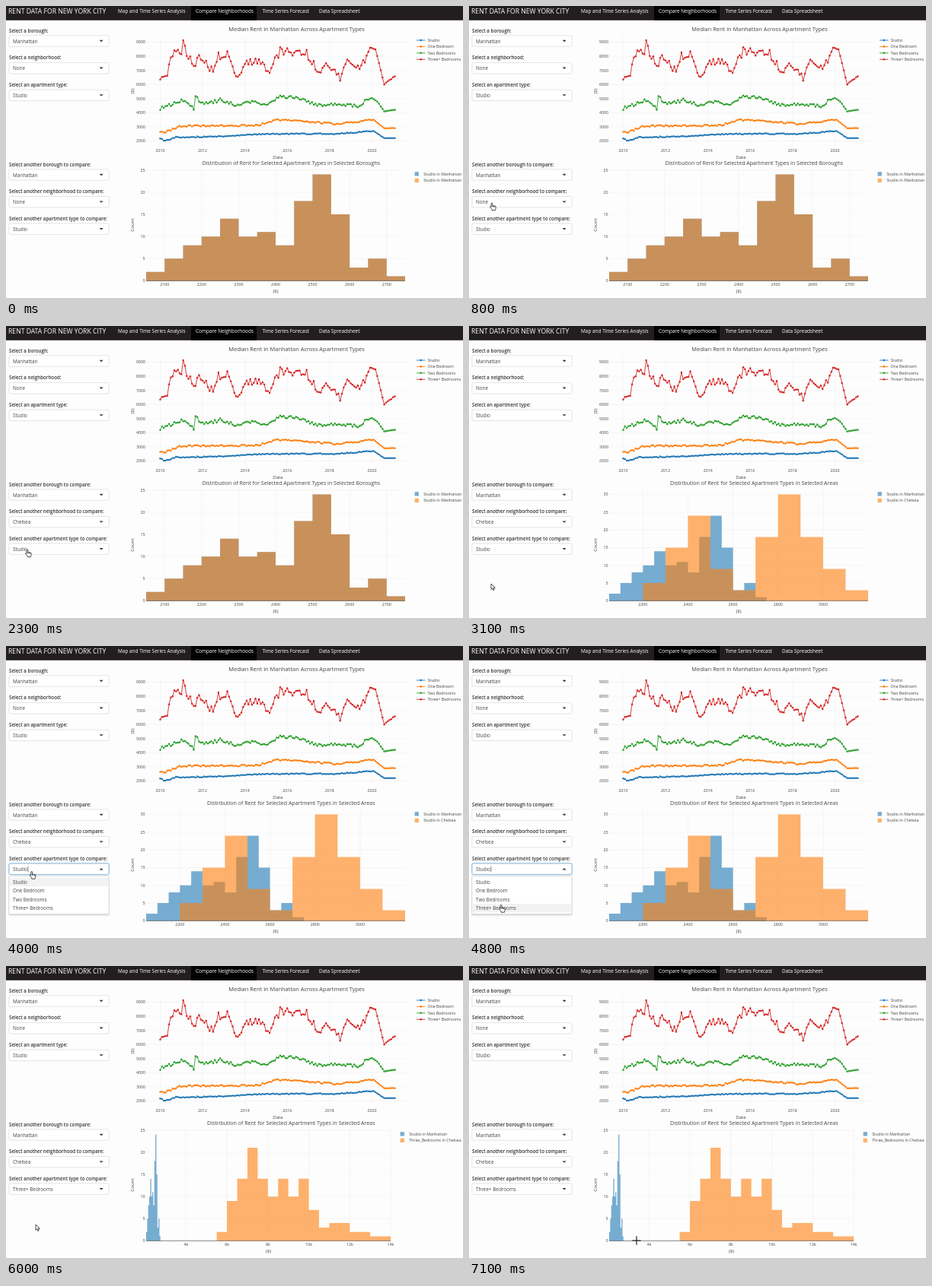
An HTML page for the animation above (7200 ms loop, 600 by 384 pixels).

```html
<!DOCTYPE html>
<html lang="en">
<head>
<meta charset="utf-8">
<title>Rent data</title>
<style>
  html, body { margin: 0; width: 100%; height: 100%; overflow: hidden; background: #fdfdfd; }
  svg { display: block; width: 600px; height: 384px; }
  text { white-space: pre; font-family: "Open Sans", "Noto Sans", sans-serif; }
</style>
</head>
<body>
<svg id="stage" viewBox="0 0 600 384"><g id="fixed"></g><g id="live"></g></svg>
<script>
const LOOP = 7200, STEP = 100;
const BLUE = '#1f77b4', ORANGE = '#ff7f0e', GREEN = '#2ca02c', RED = '#d62728';
const GRID = '#ececec';

// Helpers: text y is the vertical centre of the capitals
const rect = (x, y, w, h, fill, extra = '') =>
  `<rect x="${x}" y="${y}" width="${w}" height="${h}" fill="${fill}" ${extra}/>`;
const line = (x1, y1, x2, y2, color, w) =>
  `<path d="M${x1} ${y1}L${x2} ${y2}" stroke="${color}" stroke-width="${w}"/>`;
const text = (x, y, s, size, fill, extra = '') =>
  `<text x="${x}" y="${y + size * 0.36}" font-size="${size}" fill="${fill}" ${extra}>${s}</text>`;
const ui = (x, y, s) => text(x, y, s, 6.35, '#444');
const plot = (x, y, s, size = 5.27, anchor = 'start') => text(x, y, s, size, '#444', `text-anchor="${anchor}"`);
const upright = (x, y, s) => `<g transform="translate(${x} ${y}) rotate(-90)">${plot(0, 0, s, 6.14, 'middle')}</g>`;

// ---- Page header, labels, selects ----
function header() {
  const tabs = [[147, 'Map and Time Series Analysis'], [249, 'Compare Neighborhoods'],
    [336.5, 'Time Series Forecast'], [411, 'Data Spreadsheet']];
  return rect(0, 0, 600, 18.8, '#221e20') + rect(243, 0, 86, 18.8, '#030303') +
    text(3, 6.5, 'RENT DATA FOR NEW YORK CITY', 8.65, '#fff') +
    tabs.map(([x, s]) => text(x, 7.1, s, 6.45, '#fff')).join('');
}

function labels() {
  const group = (top, names) => names.map((s, i) =>
    text(4, top + i * 35.65, `Select ${s}:`, 6.2, '#333', 'font-weight="600"')).join('');
  return group(32.4, ['a borough', 'a neighborhood', 'an apartment type']) +
    group(208.4, ['another borough to compare', 'another neighborhood to compare', 'another apartment type to compare']);
}

function select(y, value, open) {
  const edge = open ? 'stroke="#74a9cf" stroke-width=".8"' : 'stroke="#d2d2d2" stroke-width=".6"';
  const glow = open ? rect(3.2, y - 8, 132.6, 16, 'none', 'rx="2.4" stroke="#d3e6f2" stroke-width=".9"') : '';
  const d = open ? 1.2 : -1.2;
  return glow + rect(4, y - 7.2, 131, 14.4, '#fff', `rx="1.8" ${edge}`) + ui(9, y + 0.3, value) +
    `<path d="M122.6 ${y + d}h5l-2.5 ${-2 * d}z" fill="#333"/>`;
}

// ---- Rent over time ----
const MONTHS = 134;
const monthX = i => 202.5 + i * 2.316;
const rentY = v => 177.4 - (v - 20) * 1.855;

// Turning points as [month, rent in hundreds], plus the size of the monthly jitter
const rents = [
  { name: 'Studio', color: BLUE, jitter: 0.35,
    keys: [[0, 22], [2, 20], [9, 22.5], [30, 23], [60, 25], [100, 25], [121, 27], [127, 22], [133, 22]] },
  { name: 'One Bedroom', color: ORANGE, jitter: 0.6,
    keys: [[0, 27], [3, 26], [11, 30.5], [55, 31], [66, 35], [80, 34], [100, 32], [121, 35], [127, 29], [133, 29]] },
  { name: 'Two Bedrooms', color: GREEN, jitter: 1.2,
    keys: [[0, 43], [13, 49], [19, 43], [20, 51], [25, 46], [34, 49], [43, 45], [48, 48], [62, 46],
      [67, 51], [76, 51], [88, 46], [113, 45], [119, 51], [123, 48], [127, 41], [133, 42]] },
  { name: 'Three+ Bedrooms', color: RED, jitter: 2.8,
    keys: [[0, 66], [3, 65], [8, 84], [12, 80], [13, 89], [16, 79], [20, 72], [22, 81], [30, 69], [33, 80], [39, 81],
      [43, 66], [49, 75], [57, 77], [62, 69], [68, 84], [74, 83], [83, 82], [91, 67], [95, 76],
      [102, 64], [107, 79], [113, 70], [119, 86], [122, 85], [127, 60], [133, 66]] }
];

function randomFrom(seed) {
  return () => (seed = seed * 16807 % 2147483647) / 2147483647;
}

function rentAt(keys, month) {
  const i = Math.max(1, keys.findIndex(k => k[0] >= month));
  const [m1, v1] = keys[i - 1], [m2, v2] = keys[i];
  return v1 + (v2 - v1) * (month - m1) / (m2 - m1);
}

function series({ keys, color, jitter }, index) {
  const random = randomFrom(4211 + index * 977);
  const pts = Array.from({ length: MONTHS }, (_, i) => {
    const calm = i > 119 ? 0.1 : 1;
    const v = rentAt(keys, i) + (random() * 2 - 1) * jitter * calm;
    return [monthX(i).toFixed(2), rentY(v).toFixed(2)];
  });
  return `<polyline points="${pts.join(' ')}" fill="none" stroke="${color}" stroke-width=".9" stroke-linejoin="round"/>` +
    pts.map(([x, y]) => `<circle cx="${x}" cy="${y}" r="1.25" fill="${color}"/>`).join('');
}

function rentChart() {
  let s = plot(381.5, 30.8, 'Median Rent in Manhattan Across Apartment Types', 7.46, 'middle');
  for (let v = 20; v <= 90; v += 10) {
    s += line(184, rentY(v), 529, rentY(v), GRID, 0.5) + plot(183, rentY(v), v * 100, 5.27, 'end');
  }
  for (let year = 2010; year <= 2020; year += 2) {
    const x = monthX((year - 2010) * 12);
    s += line(x, 40, x, 184.5, GRID, 0.5) + plot(x, 190.5, year, 5.27, 'middle');
  }
  s += plot(357, 199, 'Date', 6.14, 'middle') + upright(166, 112, '($)');
  rents.forEach((rent, i) => {
    const y = 45 + i * 8.4;
    s += series(rent, i) + line(539, y, 550.5, y, rent.color, 0.9) +
      `<circle cx="544.8" cy="${y}" r="1.3" fill="${rent.color}"/>` + plot(553.4, y, rent.name);
  });
  return s;
}

// ---- Histograms ----
const LEFT = 184, BASE = 361.4, LOWEST = 2050;
const studio = { name: 'Studio in Manhattan', from: LOWEST, size: 50,
  n: [2, 5, 8, 10, 14, 10, 11, 8, 18, 24, 15, 3, 5, 1] };
const chelseaStudio = { name: 'Studio in Chelsea', from: 2200, size: 100,
  n: [5, 15, 24, 9, 3, 18, 30, 18, 9, 3] };
const chelseaThree = { name: 'Three_Bedrooms in Chelsea', from: 5500, size: 500,
  n: [2, 9, 14, 21, 14, 10, 14, 10, 14, 7, 3, 4, 4, 2, 2, 1, 1] };

function histogram(other, area, right, step, lastTick) {
  const high = other.from + other.n.length * other.size;
  const most = Math.max(...studio.n, ...other.n);
  const px = v => +(LEFT + (v - LOWEST) / (high - LOWEST) * (right - LEFT)).toFixed(2);
  const py = n => +(BASE - n / most * 139.8).toFixed(2);
  const bars = ({ from, size, n }, color) => {
    const tops = n.map((c, i) => `V${py(c)}H${px(from + (i + 1) * size)}`).join('');
    return `<path d="M${px(from)} ${BASE}${tops}V${BASE}Z" fill="${color}" fill-opacity=".6"/>`;
  };

  let s = plot(374.3, 206.6, `Distribution of Rent for Selected Apartment Types in Selected ${area}`, 7.04, 'middle');
  for (let n = 0; n <= most * 1.05; n += 5) {
    s += line(LEFT, py(n), right, py(n), GRID, 0.5) + plot(182.5, py(n), n, 5.27, 'end');
  }
  for (let v = Math.ceil(LOWEST / step) * step; v <= lastTick; v += step) {
    s += line(px(v), 214.5, px(v), BASE, GRID, 0.5) +
      plot(px(v), 366.2, step < 1000 ? v : v / 1000 + 'k', 5.27, 'middle');
  }
  s += bars(studio, BLUE) + bars(other, ORANGE) + line(LEFT, BASE, right, BASE, '#444', 0.6);
  s += plot((LEFT + right) / 2, 375.2, '($)', 6.14, 'middle') + upright(166, 288, 'Count');
  [[studio, BLUE], [other, ORANGE]].forEach(([data, c], i) => {
    const x = right + 12.6, y = 220.8 + i * 8.5;
    s += rect(x, y - 2.6, 5.3, 5.3, c, 'fill-opacity=".6"') + plot(x + 11.6, y, data.name);
  });
  return s;
}

const charts = [
  { until: 2600, art: histogram(studio, 'Boroughs', 524, 100, 2700) },
  { until: 5200, art: histogram(chelseaStudio, 'Areas', 524, 200, 3000) },
  { until: LOOP, art: histogram(chelseaThree, 'Areas', 505, 2000, 14000) }
];

// ---- Menus ----
const ROW = 11.45;
const areaMenu = { y: 266, h: 89.5, first: 269.2, scroll: true, open: 900, close: 2100,
  items: ['None', 'Battery Park City', 'Chelsea', 'Chinatown', 'Civic Center', 'East Harlem', 'East Village', 'Financial District'] };
const typeMenu = { y: 302.5, h: 50, first: 304.6, scroll: false, open: 3800, close: 5000,
  items: ['Studio', 'One Bedroom', 'Two Bedrooms', 'Three+ Bedrooms'] };
const isOpen = (m, t) => t >= m.open && t < m.close;

function menu(m, cursorY) {
  const { y, h } = m;
  const hover = Math.max(0, Math.floor((cursorY - m.first) / ROW));
  let rows = '';
  m.items.forEach((s, i) => {
    const top = m.first + i * ROW;
    if (i === hover) rows += rect(4, top, 131, ROW, '#f2f2f2');
    rows += ui(9, top + ROW / 2, s);
  });
  if (m.scroll) {
    rows += rect(127.3, y + 1.5, 7, h - 3, '#f3f3f3') + rect(128, 274.5, 5.6, 25.5, '#c4c4c4') +
      '<path d="M129.2 271.6h3.2l-1.6-2zM129.2 349.6h3.2l-1.6 2z" fill="#555"/>';
  }
  return rect(3, y, 133, h + 3, '#000', 'rx="2.5" opacity=".06"') +
    rect(3.5, y, 132, h + 1.5, '#000', 'rx="2" opacity=".08"') +
    rect(4, y, 131, h, '#fff', 'rx="1.5" stroke="#d0d0d0" stroke-width=".6"') +
    `<svg x="0" y="${y + 1}" width="135" height="${h - 1.6}" viewBox="0 ${y + 1} 135 ${h - 1.6}">${rows}</svg>`;
}

// ---- Pointer ----
// Moves as [start, end, x, y]; the pointer rests in between
const ENTER = 400;
const moves = [[ENTER, 800, 30, 259], [1000, 1300, 27, 282], [1900, 2000, 28, 294], [2300, 2700, 29, 339],
  [3300, 3700, 33, 293], [3900, 4500, 42, 340.5], [5000, 5300, 39, 340], [6400, 7000, 220, 361]];
const ARROW = 'M0 0V17L4 13.2L6.8 19.5L9.6 18.3L6.9 12.2H12.2Z';
const HAND = 'M-2 2a2 2 0 0 1 4 0v6l2 .2q1.5-.7 2.5.5q2-.5 2.8.8q2.5 0 2.5 2v4q0 2-1.5 4v2.5h-10v-2.5' +
  'q-1-2-4-5.5q-2-2.5-1.5-3.3q1-1 3.2 1z';

function pointerAt(t) {
  let x = 62, y = 320;
  for (const [from, to, nextX, nextY] of moves) {
    const u = Math.min(1, Math.max(0, (t - from) / (to - from)));
    const e = u * u * (3 - 2 * u);
    x += (nextX - x) * e;
    y += (nextY - y) * e;
  }
  return [x, y];
}

function pointer(t, x, y) {
  const at = `translate(${x.toFixed(2)} ${y.toFixed(2)})`;
  if (x > LEFT && y < BASE) {
    return `<path transform="${at}" d="M-5.7 0H5.7M0-5.7V5.7" stroke="#111" stroke-width="1.1"/>`;
  }
  const inMenu = [areaMenu, typeMenu].some(m => isOpen(m, t) && y > m.y && y < m.y + m.h);
  const inSelect = [257.6, 293.2].some(c => Math.abs(y - c) < 7.2);
  const hand = x < 135 && (inMenu || inSelect);
  return `<g transform="${at} scale(.44)" fill="#fff" stroke="#111" stroke-width="1.7" stroke-linejoin="round">` +
    `<path d="${hand ? HAND : ARROW}"/>${hand ? '<path d="M2 8v4M5.5 9v3M8.5 10v3" fill="none"/>' : ''}</g>`;
}

// ---- Playback ----
const live = document.getElementById('live');

function draw(t) {
  const [x, y] = pointerAt(t);
  const areaOpen = isOpen(areaMenu, t), typeOpen = isOpen(typeMenu, t);
  let s = charts.find(c => t < c.until).art;
  s += select(257.6, t < areaMenu.close ? 'None' : 'Chelsea', areaOpen);
  s += select(293.2, t < typeMenu.close ? 'Studio' : 'Three+ Bedrooms', typeOpen);
  if (areaOpen) s += menu(areaMenu, y);
  if (typeOpen) {
    s += menu(typeMenu, y);
    if ((t - typeMenu.open) % 1000 < 500) s += line(28.9, 289.8, 28.9, 297.2, '#222', 0.6);
  }
  if (t >= ENTER) s += pointer(t, x, y);
  live.innerHTML = s;
}

document.getElementById('fixed').innerHTML = rect(0, 0, 600, 384, '#fdfdfd') + header() + labels() +
  select(46, 'Manhattan') + select(81.8, 'None') + select(117.4, 'Studio') + select(222, 'Manhattan') + rentChart();

const start = performance.now();
let shown = -1;
function frame(now) {
  const t = Math.floor(Math.max(0, now - start) % LOOP / STEP) * STEP;
  if (t !== shown) draw(shown = t);
  requestAnimationFrame(frame);
}
frame(start);
</script>
</body>
</html>
```
